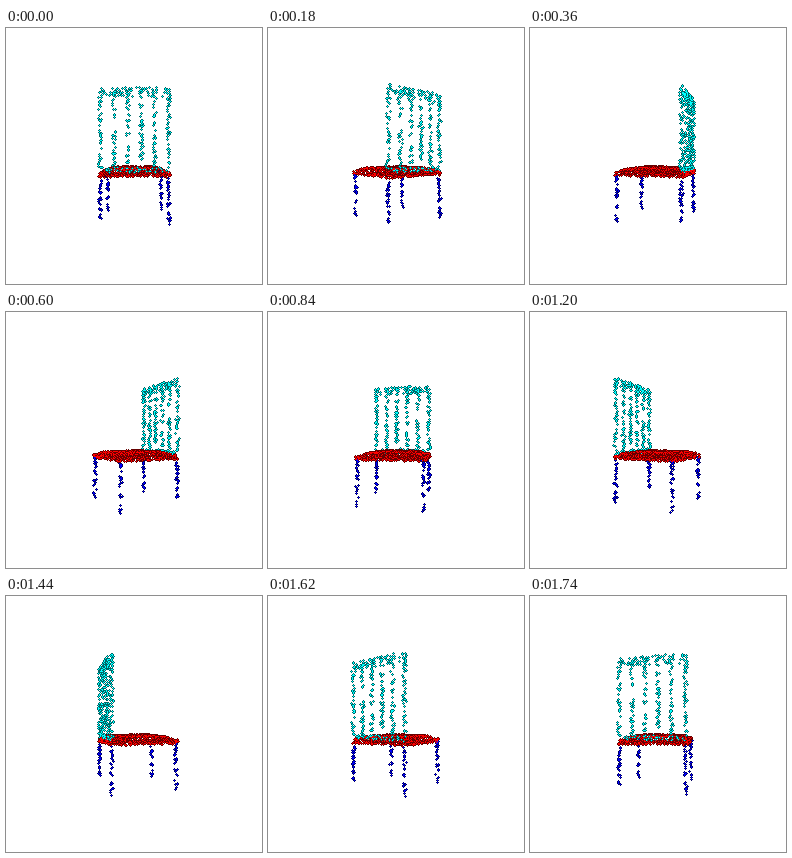
A matplotlib script for the animation above (1.8 s loop, 256 by 256 pixels).

```python
import numpy as np
import matplotlib.pyplot as plt
from matplotlib.animation import FuncAnimation

SIZE, FRAMES, LOOP = 256, 30, 1800
CAMERA = 240          # distance from eye to the turning axis
CENTER = 128
CYAN, RED, BLUE = (0, 1, 1), (1, 0, 0), (0, 0, 1)

rng = np.random.default_rng(7)


def box(n, xs, ys, zs):
    """Random points in a box; y points down, z towards the eye."""
    return np.column_stack([rng.uniform(*r, n) for r in (xs, ys, zs)])


def around(c, r):
    return c - r, c + r


def chair_back():
    parts = [box(44, around(x, 1.6), (-58, 11), around(30, 1.6))
             for x in (-30, -18, -6, 6, 18, 30)]
    parts.append(box(75, (-31, 31), (-60, -52), around(30, 1.6)))
    parts.append(box(45, (-30, 30), (9.5, 14), around(30, 1.6)))
    return np.vstack(parts)


def chair_seat():
    top = box(430, (-31, 31), (11, 11), (-32.5, 31))
    edge = np.maximum(abs(top[:, 0]) / 31, abs(top[:, 2]) / 32.5)
    top[:, 1] += 4.5 * edge ** 6
    bottom = box(230, (-31, 31), (17, 18), (-32, 31))
    sides = [box(45, around(x, 0.5), (14, 18), (-32, 31)) for x in (-31, 31)]
    sides += [box(45, (-31, 31), (14, 18), around(z, 0.5)) for z in (-32, 31)]
    return np.vstack([top, bottom, *sides])


def chair_legs():
    return np.vstack([box(34, around(x, 1.4), (17, 60.5), around(z, 1.4))
                      for x in (-30, 30) for z in (-30.5, 30)])


parts = [(chair_back(), CYAN), (chair_seat(), RED), (chair_legs(), BLUE)]
points = np.vstack([p for p, _ in parts])
colors = np.vstack([np.tile(c, (len(p), 1)) for p, c in parts])

# Each dot is a tiny ball: bright core, dark rim (dx, dy, shade, bump)
BALL = [(0, 0, 1.0, 10)] + [(dx, dy, 0.4, 0)
                            for dx, dy in ((1, 0), (-1, 0), (0, 1), (0, -1))]


def render(i):
    a = 2 * np.pi * i / FRAMES
    x, y, z = points.T
    depth = z * np.cos(a) - x * np.sin(a)
    scale = CAMERA / (CAMERA - depth)
    px = np.rint(CENTER + (x * np.cos(a) + z * np.sin(a)) * scale).astype(int)
    py = np.rint(CENTER + y * scale).astype(int)

    cols = np.concatenate([px + dx for dx, _, _, _ in BALL])
    rows = np.concatenate([py + dy for _, dy, _, _ in BALL])
    tint = np.concatenate([colors * shade for _, _, shade, _ in BALL])
    order = np.argsort(np.concatenate([depth + bump for *_, bump in BALL]))

    img = np.ones((SIZE, SIZE, 3))
    img[rows[order], cols[order]] = tint[order]
    return img


fig = plt.figure(figsize=(SIZE / 100, SIZE / 100), dpi=100, facecolor="white")
ax = fig.add_axes([0, 0, 1, 1])
ax.axis("off")
view = ax.imshow(render(0), interpolation="nearest", aspect="auto")


def update(i):
    view.set_data(render(i))
    return (view,)


anim = FuncAnimation(fig, update, frames=FRAMES, interval=LOOP / FRAMES,
                     repeat=True, repeat_delay=0, blit=False)
plt.show()
```
